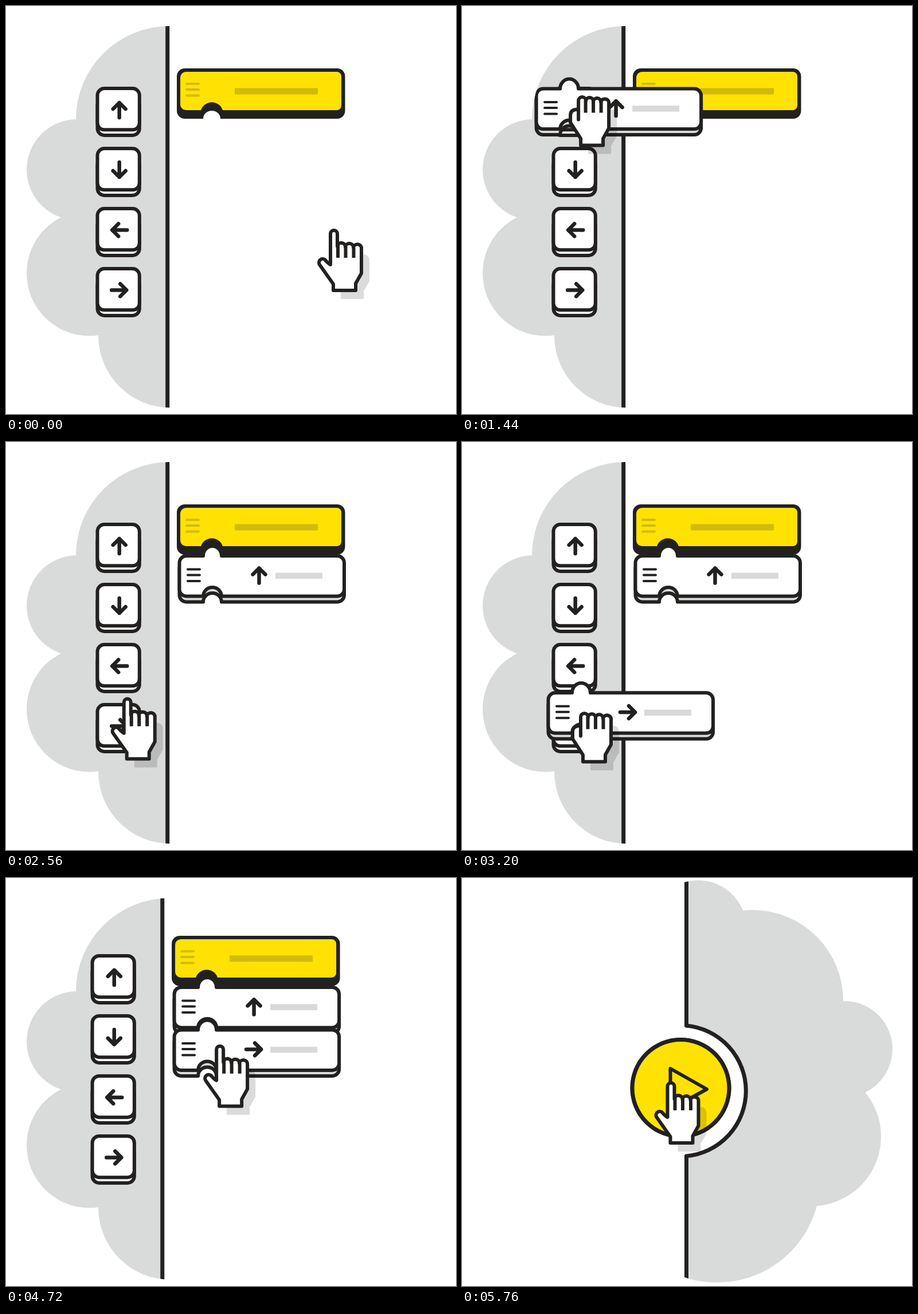
Write an HTML page that moves like this. It is 785 by 713 pixels and loops after 6.16 s.

```html
<!DOCTYPE html>
<html lang="en">
<head>
<meta charset="utf-8">
<title>Drag and drop blocks</title>
<style>
  html, body { margin: 0; width: 100%; height: 100%; overflow: hidden; background: #fff; }
  svg { display: block; width: 100%; height: 100%; }
  .line { stroke: #222120; stroke-width: 6; stroke-linejoin: round; }
  .round { stroke-linecap: round; }
  .bold { stroke-width: 6.5; }
  .thick { stroke-width: 7; }
  .white { fill: #fff; }
  .grey { fill: #d9dbda; }
  .none { fill: none; }
</style>
</head>
<body>
<svg viewBox="0 0 785 713">
  <defs>
    <clipPath id="cloud">
      <circle cx="285" cy="198" r="163"/>
      <circle cx="412" cy="88" r="84"/>
      <circle cx="507" cy="214" r="158"/>
      <circle cx="667" cy="299" r="84"/>
      <circle cx="609.6" cy="452" r="121.4"/>
      <circle cx="445" cy="527" r="180"/>
      <circle cx="287" cy="576" r="126"/>
      <circle cx="145.5" cy="467" r="109.5"/>
      <circle cx="124" cy="286" r="88"/>
      <path d="M285 198L412 88L507 214L667 299L610 452L445 527L287 576L145 467L124 286Z"/>
    </clipPath>
    <path id="arrow" class="line round bold none" d="M0 13.5V-12.5M-11 -1.5L0 -12.5L11 -1.5"/>
    <path id="shell" class="line" d="M302.5 211a12 12 0 0 1 12-12H344a16 17 0 0 1 32 0H578a12 12 0 0 1 12 12V257.5a12 12 0 0 1-12 12H376a16 15.5 0 0 0-32 0H314.5a12 12 0 0 1-12-12Z"/>
    <path id="menu" class="round" stroke-width="4" d="M317 222.5h21M317 232.5h21M317 243h21"/>
    <g id="key">
      <rect class="line white" x="159.5" y="20" width="73.3" height="65" rx="12"/>
      <rect class="line white" x="159.5" y="3" width="73.3" height="72.3" rx="12"/>
    </g>
    <g id="block">
      <use href="#shell" y="10" class="grey"/>
      <use href="#shell" class="white"/>
      <use href="#menu" stroke="#222120"/>
      <rect fill="#d9d9d9" x="470" y="228.5" width="82" height="10.5"/>
    </g>
  </defs>

  <g clip-path="url(#cloud)">
    <g id="editor">
      <rect class="grey" x="-500" y="-500" width="780" height="2000"/>
      <path class="line thick" d="M281.7 -500V1500"/>
      <g id="keys"></g>
      <path fill="#222120" d="M298 123a14 14 0 0 1 14-14H577.5a14 14 0 0 1 14 14V183a14 14 0 0 1-14 14H374a15 14 0 0 0-30 0H312a14 14 0 0 1-14-14Z"/>
      <path fill="#ffe203" d="M304 125a10 10 0 0 1 10-10H577a8 8 0 0 1 8 8V174a8 8 0 0 1-8 8H378A20 20 0 0 0 340 182H314a10 10 0 0 1-10-10Z"/>
      <use href="#menu" x="-2" y="-86.5" stroke="#d2bb0c"/>
      <rect fill="#d2bb0c" x="399" y="143.5" width="145" height="11"/>
      <g id="first"><use href="#block"/><use href="#arrow" transform="translate(441.5 233)"/></g>
      <g id="second"><use href="#block"/><use href="#arrow" transform="translate(441.5 233) rotate(90)"/></g>
    </g>
    <g id="player">
      <path class="line thick grey" d="M391.5 -600V258A114.5 114.5 0 0 1 391.5 486V1300H1400V-600Z"/>
      <rect id="base" class="line thick grey" x="297" width="169" rx="84.5"/>
      <g id="cap">
        <circle id="face" class="line thick" cx="381.5" cy="360" r="84.5"/>
        <path id="play" class="line" d="M363.5 326L427 362L363.5 397Z"/>
      </g>
    </g>
  </g>

  <g id="hand">
    <path fill="#000" opacity=".14" d="M600 445L614 436Q620 434 623 434Q634 434 634 446V481L624 498V512H584V490Z"/>
    <g id="point">
      <path class="line white" d="M566 452V398a6 6 0 0 1 12 0V420a7 6.5 0 0 1 14 1a7 6.5 0 0 1 14 1a7 6.5 0 0 1 14 2V467L610 485V497H571V486L547 452a6.5 6.5 0 0 1 9-9Q562 450 566 452Z"/>
      <path class="line" d="M579 417V440M592.5 420V440M606.5 422V440"/>
    </g>
    <g id="grab">
      <path class="line white round" d="M567 452V419a6.5 6.5 0 0 1 13 0a6.5 6 0 0 1 13 1a6.5 6 0 0 1 13 1a7 6.5 0 0 1 14 3V467L610 485V497H571V485L553 457V444Q553 434 567 434"/>
      <path class="line" d="M579.5 418V440M593 419V440M606.5 421V440"/>
    </g>
  </g>
</svg>
<script>
const LOOP = 6160, STEP = 80;
const $ = id => document.getElementById(id);

$('keys').innerHTML = [0, 180, -90, 90].map((turn, i) =>
  `<use href="#key" y="${141 + 105 * i}"/>
   <use href="#arrow" transform="translate(197.7 ${181.5 + 105 * i}) rotate(${turn})"/>`).join('');

const ease = (t, from, to) => {
  const u = Math.min(1, Math.max(0, (t - from) / (to - from)));
  return u * u * (3 - 2 * u);
};
const mix = (a, b, s) => a + (b - a) * s;
const bezier = (s, pts) => [0, 1].map(i => {
  const [a, b, c, d] = pts.map(p => p[i]), r = 1 - s;
  return r * r * r * a + 3 * r * r * s * b + 3 * r * s * s * c + s * s * s * d;
});
const add = (a, b) => [a[0] + b[0], a[1] + b[1]];
const move = (id, [x, y]) => $(id).setAttribute('transform', `translate(${x} ${y})`);
const show = (id, on) => $(id).style.display = on ? '' : 'none';

// Hand and block paths, relative to their resting places
const REACH = [[0, 0], [-60, 55], [-367, -150], [-365, -257.5]];
const DRAG_1 = [[-174, -58.5], [-175, -41], [-74, 23], [0, 0]];
const BACK = [[-191, -199], [-130, -180], [-330, 30], [-368, 64]];
const DRAG_2 = [[-160, 241.5], [-161, 262], [-11, 86], [0, 74.5]];
const HOLD_1 = [-191, -199], HOLD_2 = [-208, -177.5];

function handAt(t, first, second, press) {
  if (t < 1280) return bezier(ease(t, 320, 1040), REACH);
  if (t < 2080) return add(first, HOLD_1);
  if (t < 2960) return bezier(ease(t, 2080, 2640), BACK);
  if (t < 4640) return add(second, HOLD_2);
  const s = ease(t, 4620, 5287);
  return [-207.5 + 152 * s * (1 - s), mix(-102, -41, s) + 7 * press];
}

function draw(t) {
  const first = bezier(ease(t, 1320, 2080), DRAG_1);
  const second = bezier(ease(t, 3000, 3840), DRAG_2);
  const slide = ease(t, 4640, 5540);
  const press = ease(t, 5520, 5760);

  move('first', first);
  move('second', second);
  show('first', t >= 1280);
  show('second', t >= 2960);

  move('editor', [-400 * slide, -364 * slide]);
  move('player', [400 * (1 - slide), 364 * (1 - slide)]);
  move('cap', [0, 7 * press]);
  $('base').setAttribute('y', 275.5 + 7 * press);
  $('base').setAttribute('height', 183 - 14 * press);
  const tint = (r, g, b) =>
    `rgb(${mix(r, 255, press)},${mix(g, 226, press)},${mix(b, 3, press)})`;
  $('face').style.fill = tint(255, 255, 255);
  $('play').style.fill = tint(217, 219, 218);

  const closed = t >= 960 && t < 2080 || t >= 2640 && t < 3840;
  move('hand', handAt(t, first, second, press));
  show('grab', closed);
  show('point', !closed);
}

const begin = performance.now();
function tick() {
  const t = (performance.now() - begin) % LOOP;
  draw(Math.floor(t / STEP) * STEP);
  requestAnimationFrame(tick);
}
tick();
</script>
</body>
</html>
```
